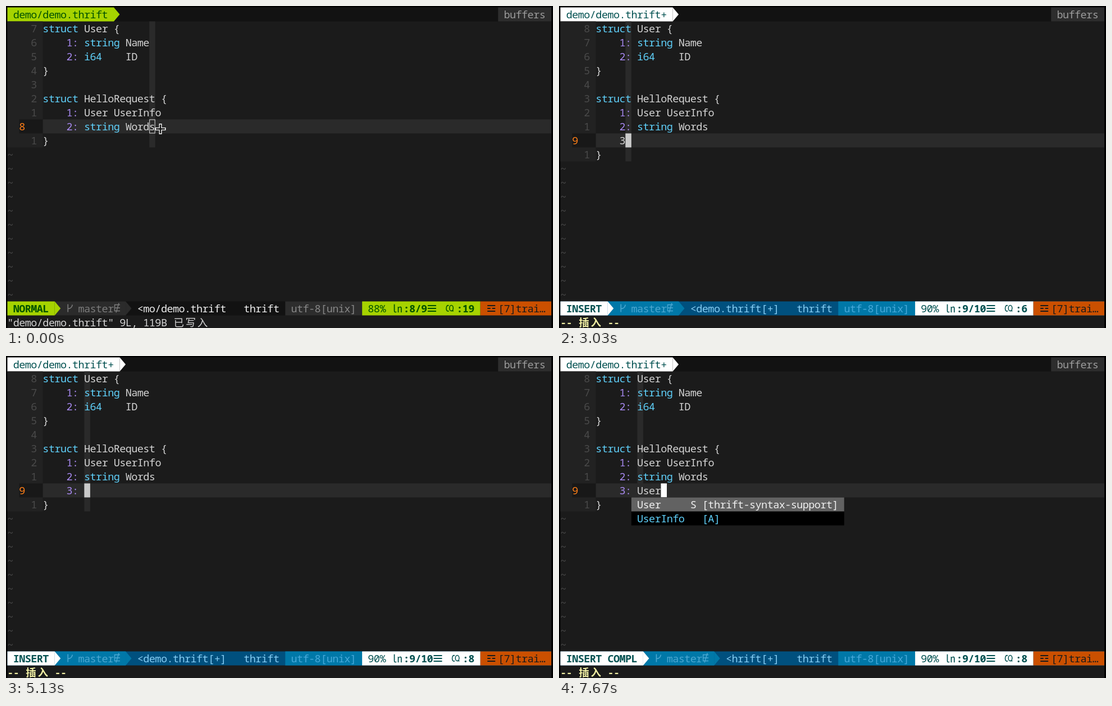
An HTML page for the animation above (8000 ms loop, 974 px wide and 575 px high).

```html
<!DOCTYPE html>
<html lang="en">
<head>
<meta charset="utf-8">
<title>Thrift completion in a terminal editor</title>
<style>
html, body { margin: 0; width: 100%; height: 100%; overflow: hidden; background: #000; }
svg { display: block; width: 974px; height: 575px; }
text {
  font: 18.5px "Noto Sans Mono", "Noto Sans CJK SC", "Noto Sans CJK", "DejaVu Sans Mono", monospace;
  letter-spacing: -.573px;
  white-space: pre;
}
.b { font-weight: 700; }
</style>
</head>
<body>
<svg id="stage" viewBox="0 0 974 575" xmlns="http://www.w3.org/2000/svg"></svg>
<script>
const CELL = 10.527, ROW = 25, PAD = 2.5, LOOP = 8000;
const BG = '#1b1b1b', GUTTER = '#222222', LINE = '#2a2a2a', FG = '#d4d4d4';
const CYAN = '#5fd0fa', PURPLE = '#a98af2', DIM = '#4a4a4a', CURSOR = '#cacaca';
const STATUS_ROW = 21;

const NORMAL = {
  mode: '#a6d300', modeText: '#005200', side: '#2b2b2b', sideText: '#7c7c7c',
  mid: '#121212', midText: '#eeeeee', enc: '#2d2d2d', encText: '#888888'
};
const INSERT = {
  mode: '#ffffff', modeText: '#005050', side: '#0078a8', sideText: '#4ca8d2',
  mid: '#00507e', midText: '#86cdf4', enc: '#0078a8', encText: '#46a9da'
};

const SUPPORT = '[thrift-syntax-support]';
const TYPES = { col: 9, width: 31, items: ['i32 k ' + SUPPORT] };
const USERS = { col: 12, width: 36, items: ['User     S ' + SUPPORT, 'UserInfo   [A]'] };
const PICKED = { ...USERS, selected: 0 };

// Each step holds until the next one starts.
const steps = [
  { at: 0, pointer: 'plus' },
  { at: 700, pointer: 'beam' },
  { at: 1670, typed: '' },
  { at: 3000, typed: '3' },
  { at: 3100, typed: '3', menu: TYPES },
  { at: 3900, typed: '3:' },
  { at: 4030, typed: '3: ' },
  { at: 5300, typed: '3: U' },
  { at: 5370, typed: '3: U', menu: USERS },
  { at: 5700, typed: '3: User', menu: PICKED, column: 13 }
];

const x = c => PAD + c * CELL;
const y = r => PAD + r * ROW;

function box(col, row, w, h, fill) {
  return `<rect x="${x(col).toFixed(2)}" y="${y(row)}" width="${(w * CELL).toFixed(2)}" height="${h * ROW}" fill="${fill}"/>`;
}

function text(col, row, str, fill, bold) {
  const safe = str.replace(/&/g, '&amp;').replace(/</g, '&lt;');
  return `<text x="${(x(col) - .3).toFixed(2)}" y="${y(row) + 19}" fill="${fill}"${bold ? ' class="b"' : ''}>${safe}</text>`;
}

function stroke(d, color, width) {
  return `<path d="${d}" fill="none" stroke="${color}" stroke-width="${width}"/>`;
}

function arrow(col, row, fill) {
  return `<path d="M${x(col)} ${y(row)}l${CELL} ${ROW / 2}l-${CELL} ${ROW / 2}z" fill="${fill}"/>`;
}

// Colours field numbers and type keywords; everything else is plain.
function code(row, str) {
  const token = /\d+:|\b(?:struct|string|i64)\b|[^\s]+/g;
  let out = '', m;
  while ((m = token.exec(str))) {
    const color = /^\d+:$/.test(m[0]) ? PURPLE : /^(struct|string|i64)$/.test(m[0]) ? CYAN : FG;
    out += text(6 + m.index, row, m[0], color);
  }
  return out;
}

function tabs(s, theme) {
  const name = 'demo/demo.thrift' + (s.insert ? '+' : '');
  const end = name.length + 2;
  return box(0, 0, 92, 1, '#121212') + box(0, 0, end, 1, theme.mode) + arrow(end, 0, theme.mode) +
    text(1, 0, name, theme.modeText) + box(83, 0, 9, 1, '#2d2d2d') + text(84, 0, 'buffers', '#9c9c9c');
}

function buffer(s) {
  const lines = ['struct User {', '    1: string Name', '    2: i64    ID', '}', '',
    'struct HelloRequest {', '    1: User UserInfo', '    2: string Words'];
  if (s.insert) lines.push('    ' + s.typed);
  const current = lines.length;
  lines.push('}');
  const cursor = s.insert ? 10 + s.typed.length : 24;
  const column = s.column || cursor;

  let out = box(0, 1, 6, lines.length, GUTTER) + box(2, current, 4, 1, '#181818') +
    box(6, current, 86, 1, LINE) + box(column, 1, 1, lines.length, LINE);
  lines.forEach((str, i) => {
    const row = i + 1;
    out += row === current
      ? text(2, row, String(row), '#ff7f18')
      : text(4, row, String(Math.abs(row - current)), DIM);
    out += code(row, str);
  });
  for (let row = lines.length + 1; row < STATUS_ROW; row++) out += text(0, row, '~', DIM);

  if (s.pointer === 'plus') {
    out += `<rect x="${x(cursor) + .5}" y="${y(current) + .5}" width="${CELL - 1}" height="${ROW - 1}" fill="none" stroke="#e4e4e4"/>`;
  } else {
    out += box(cursor, current, 1, 1, s.column ? '#ffffff' : CURSOR);
    if (!s.insert) out += text(cursor, current, 's', BG);
  }
  return out;
}

function branch(col, color) {
  const l = x(col), t = y(STATUS_ROW);
  return stroke(`M${l + 2.5} ${t + 5}v14M${l + 2.5} ${t + 13}c5 0 7-2 8-7`, color, 1.6);
}

function dirty(col, color) {
  const l = x(col), t = y(STATUS_ROW);
  return stroke(`M${l + 11} ${t + 6}h-9.5v11h9.5M${l + 1.5} ${t + 11.5}h9.5M${l + 9} ${t + 3}l-5 17`, color, 1.4);
}

function position(s, theme) {
  const line = s.insert ? ':9/10' : ':8/9';
  const col = s.column ? 8 : s.insert ? 5 + s.typed.length : 19;
  const bars = 67 + line.length, ring = bars + 3, ink = theme.modeText;
  const bx = x(bars) + 1, rx = x(ring) + 1, t = y(STATUS_ROW);
  return box(60, STATUS_ROW, 20, 1, theme.mode) +
    text(61, STATUS_ROW, s.insert ? '90%' : '88%', ink) +
    text(65.1, STATUS_ROW, '㏑', ink) + text(67, STATUS_ROW, line, ink, true) +
    stroke(`M${bx} ${t + 7.5}h15m-15 5h15m-15 5h15`, ink, 1.8) +
    stroke(`M${rx + 6} ${t + 7.5}c-6-3-6 13 0 9.5`, ink, 1.5) +
    `<ellipse cx="${rx + 10.5}" cy="${t + 12}" rx="3.3" ry="5" fill="none" stroke="${ink}" stroke-width="1.5"/>` +
    stroke(`M${rx + 10.5} ${t + 17}h4`, ink, 1.5) +
    text(ring + 2, STATUS_ROW, ':' + col, ink, true);
}

function warning() {
  const l = x(81) + 2, t = y(STATUS_ROW);
  return box(80, STATUS_ROW, 12, 1, '#cb5000') +
    stroke(`M${l} ${t + 7.5}h14m-14 5h5.5m3 0h5.5m-14 5h14`, BG, 1.8) +
    text(83, STATUS_ROW, '[7]trai…', BG);
}

function status(s, theme) {
  const r = STATUS_ROW;
  const mode = s.column ? 'INSERT COMPL' : s.insert ? 'INSERT' : 'NORMAL';
  const file = s.column ? '<hrift[+]' : s.insert ? '<demo.thrift[+]' : '<mo/demo.thrift';
  const end = mode.length + 2;
  return box(0, r, 92, 1, theme.mid) + box(end, r, 12, 1, theme.side) +
    box(0, r, end, 1, theme.mode) + arrow(end, r, theme.mode) + arrow(end + 12, r, theme.side) +
    text(1, r, mode, theme.modeText, true) + branch(end + 2, theme.sideText) +
    text(end + 4, r, 'master', theme.sideText) + dirty(end + 10, theme.sideText) +
    text(end + 14, r, file, theme.midText) + text(40, r, 'thrift', theme.midText) +
    box(47, r, 13, 1, theme.enc) + text(48, r, 'utf-8[unix]', theme.encText) +
    position(s, theme) + warning();
}

function message(s) {
  const r = STATUS_ROW + 1;
  const wide = (col, str, color, bold) =>
    [...str].map((ch, i) => text(col + i * 2 + .15, r, ch, color, bold)).join('');
  if (!s.insert) return text(0, r, '"demo/demo.thrift" 9L, 119B', FG) + wide(28, '已写入', FG);
  const ink = '#f2f0a4';
  return text(0, r, '--', ink, true) + wide(3, '插入', ink, true) + text(8, r, '--', ink, true);
}

function menu(m) {
  if (!m) return '';
  return box(m.col, 10, m.width, m.items.length, '#000') + m.items.map((str, i) => {
    const on = i === m.selected;
    return (on ? box(m.col, 10 + i, m.width, 1, '#626262') : '') +
      text(m.col + 1, 10 + i, str, on ? '#f0f0f0' : CYAN);
  }).join('');
}

function pointer(kind) {
  if (!kind) return '';
  if (kind === 'plus') {
    return stroke('M275 210v19M265.5 219.5h19', '#fff', 5) + stroke('M275 211.5v16M267 219.5h16', '#111', 2.4);
  }
  const beam = 'M271 211q3.5 0 3.5 3v11q0 3-3.5 3M278 211q-3.5 0-3.5 3v11q0 3 3.5 3M272.5 222h4';
  return stroke(beam, '#fff', 3) + stroke(beam, '#111', 1.3);
}

function draw(step) {
  const s = { ...step, insert: step.typed !== undefined };
  const theme = s.insert ? INSERT : NORMAL;
  return box(0, 0, 92, 23, BG) +
    tabs(s, theme) + buffer(s) + status(s, theme) + message(s) + menu(s.menu) + pointer(s.pointer);
}

const stage = document.getElementById('stage');
const start = performance.now();
let shown = null;

function render(time) {
  const step = steps.filter(s => s.at <= time).pop();
  if (step === shown) return;
  shown = step;
  stage.innerHTML = draw(step);
}

function tick() {
  render((performance.now() - start) % LOOP);
  requestAnimationFrame(tick);
}
tick();
</script>
</body>
</html>
```
